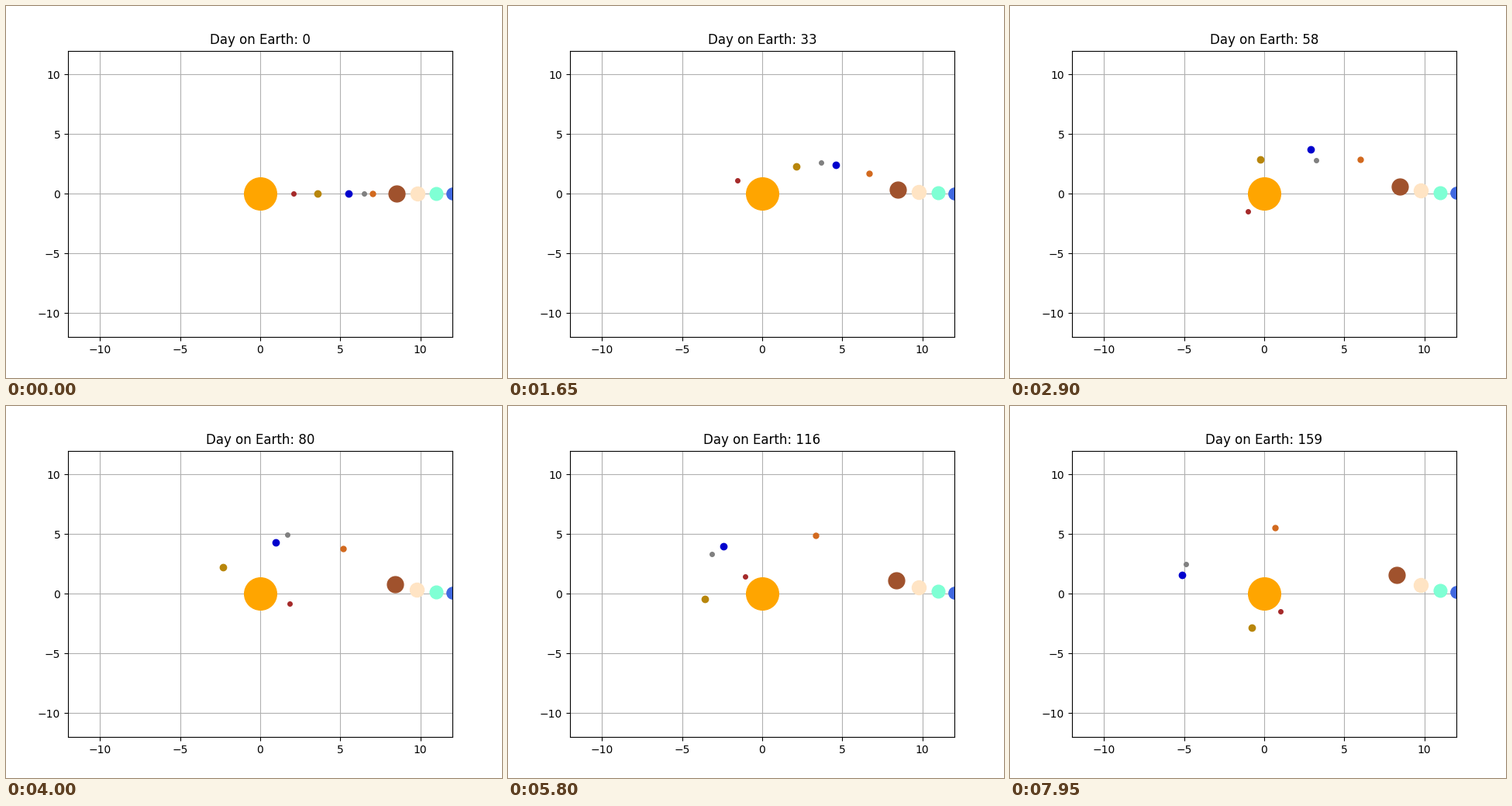
Write a matplotlib script that moves like this. It is 640x480 px and loops after 8000 ms.

```python
import numpy as np
import matplotlib.pyplot as plt
from matplotlib.animation import FuncAnimation

DAYS = 160
SQUASH = 0.8  # vertical / horizontal radius of every orbit

# orbit radius, period in days, marker size, colour
PLANETS = [
    (2.1, 88, 4, "brown"),
    (3.6, 225, 6, "darkgoldenrod"),
    (5.5, 365, 6, "mediumblue"),
    (7.0, 687, 5, "chocolate"),
    (8.5, 4333, 15, "sienna"),
    (9.8, 10759, 13, "bisque"),
    (11.0, 30687, 12, "aquamarine"),
    (12.0, 60190, 11, "royalblue"),
]
EARTH = 2
MOON_RADIUS = 0.96
MOON_RATE = 5  # degrees per day

fig, ax = plt.subplots(figsize=(6.4, 4.8), dpi=100)
ax.set_xlim(-12, 12)
ax.set_ylim(-12, 12)
ax.grid(True)
title = ax.set_title("Day on Earth: 0")


def disc(size, color):
    return ax.plot([0], [0], "o", markersize=size, color=color)[0]


sun = disc(30, "orange")
planets = [disc(size, color) for _, _, size, color in PLANETS]
moon = disc(4, "gray")


def orbit(radius, period, day):
    angle = np.radians(365 / period * day)
    return radius * np.cos(angle), SQUASH * radius * np.sin(angle)


def update(day):
    # the Earth advances exactly one degree per day
    for dot, (radius, period, _, _) in zip(planets, PLANETS):
        x, y = orbit(radius, period, day)
        if dot is planets[EARTH]:
            a = np.radians(day)
            x, y = radius * np.cos(a), SQUASH * radius * np.sin(a)
            m = np.radians(MOON_RATE * day)
            moon.set_data([x + MOON_RADIUS * np.cos(m)],
                          [y + MOON_RADIUS * np.sin(m)])
        dot.set_data([x], [y])
    title.set_text(f"Day on Earth: {day}")
    return [*planets, moon, title]


anim = FuncAnimation(fig, update, frames=DAYS, interval=50,
                     repeat=True, repeat_delay=0, blit=False)
plt.show()
```
